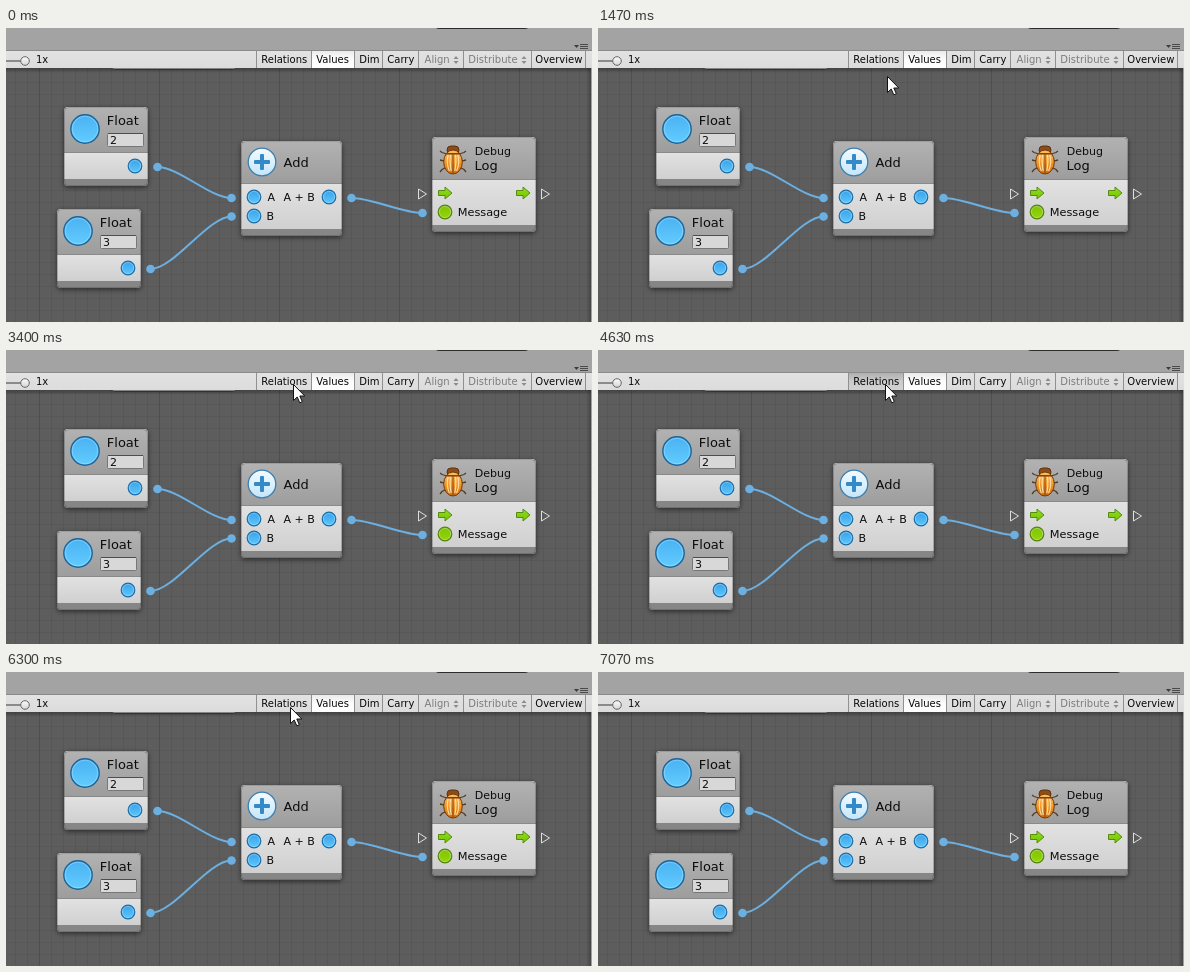
Write an HTML page with a canvas that moves like this. It is 586 by 294 pixels and loops after 7610 ms.

```html
<!DOCTYPE html>
<html>
<head>
<meta charset="utf-8">
<style>
html, body { margin: 0; width: 100%; height: 100%; overflow: hidden; background: #5c5c5c; }
canvas { display: block; width: 586px; height: 294px; }
</style>
</head>
<body>
<canvas id="stage" width="586" height="294"></canvas>
<script>
const W = 586, H = 294, LOOP = 7610;
const ctx = document.getElementById('stage').getContext('2d');
const FONT = 'px "DejaVu Sans", Verdana, sans-serif';
const BLUE = '#6cb0e2', PALE = '#dedede';

function text(str, x, y, size, color = '#0c0c0c') {
  ctx.font = size + FONT;
  ctx.fillStyle = color;
  ctx.fillText(str, x, y);
}

function rect(x, y, w, h, fill) {
  ctx.fillStyle = fill;
  ctx.fillRect(x, y, w, h);
}

function gradient(x0, y0, x1, y1, colors) {
  const g = ctx.createLinearGradient(x0, y0, x1, y1);
  colors.forEach((c, i) => g.addColorStop(i / (colors.length - 1), c));
  return g;
}

function vertical(y0, y1, ...colors) {
  return gradient(0, y0, 0, y1, colors);
}

function paint(fill, stroke, width = 1) {
  if (fill) { ctx.fillStyle = fill; ctx.fill(); }
  if (stroke) { ctx.strokeStyle = stroke; ctx.lineWidth = width; ctx.stroke(); }
}

function shape(points, fill, stroke, width) {
  ctx.beginPath();
  points.forEach(([x, y]) => ctx.lineTo(x, y));
  ctx.closePath();
  paint(fill, stroke, width);
}

function disc(x, y, r, fill, stroke, width) {
  ctx.beginPath();
  ctx.arc(x, y, r, 0, Math.PI * 2);
  paint(fill, stroke, width);
}

function box(x, y, w, h, r, fill, stroke) {
  ctx.beginPath();
  ctx.roundRect(x, y, w, h, r);
  paint(fill, stroke);
}

function curve(x0, y0, x1, y1, x2, y2, x3, y3, color) {
  ctx.beginPath();
  ctx.moveTo(x0, y0);
  ctx.bezierCurveTo(x1, y1, x2, y2, x3, y3);
  paint(null, color, 2);
}

function link(x0, y0, x1, y1, color = BLUE) {
  const pull = (x1 - x0) * .29;
  curve(x0, y0, x0 + pull, y0, x1 - pull, y1, x1, y1, color);
}

// Backdrop and toolbar

function backdrop() {
  rect(0, 40, W, H - 40, '#5d5d5d');
  for (let x = 9; x < W; x += 12) rect(x, 40, 1, H, `rgba(0,0,0,${x % 120 === 33 ? .14 : .06})`);
  for (let y = 42; y < H; y += 12) rect(0, y, W, 1, 'rgba(0,0,0,.05)');
  rect(0, 40, W, 5, vertical(40, 45, 'rgba(0,0,0,.3)', 'rgba(0,0,0,0)'));
  rect(W - 6, 40, 6, H, gradient(W - 6, 0, W, 0, ['rgba(0,0,0,0)', 'rgba(0,0,0,.3)']));
  rect(W - 1, 40, 1, H, '#a0a0a0');
  box(104.5, 30.5, 127, 11, 4, '#858585', '#333');
}

function sorter(x) {
  shape([[x - 2.5, 31], [x, 28], [x + 2.5, 31]], '#8c8c8c');
  shape([[x - 2.5, 33], [x, 36], [x + 2.5, 33]], '#8c8c8c');
}

const BUTTONS = [
  ['Relations', 250, 305, 255], ['Values', 305, 348, 310], ['Dim', 348, 376, 353],
  ['Carry', 376, 412, 381], ['Align', 412, 457, 418.3], ['Distribute', 457, 525, 462],
  ['Overview', 525, 579, 529]
];
const FACES = {
  off: ['#e2e2e2', '#dcdcdc'],
  on: ['#ebebeb', '#fcfcfc', '#fff'],
  press: ['#b0b0b0', '#cbcbcb', '#d2d2d2'],
  onPress: ['#dedede', '#f2f2f2', '#f6f6f6']
};

function toolbar(face) {
  rect(0, 0, W, 23, '#a3a3a3');
  box(429.5, -8, 93, 8.5, 3, '#555', '#2c2c2c');
  shape([[568, 17], [573, 17], [570.5, 20]], '#3c3c3c');
  for (let y = 16; y < 22; y += 2) rect(574, y, 8, 1, '#4a4a4a');
  rect(0, 22, W, 1, '#8a8a8a');
  rect(0, 23, W, 17, vertical(23, 40, ...FACES.off));

  rect(0, 32, 16, 2, '#8b8b8b');
  disc(19, 33, 4.3, vertical(28, 38, '#fff', '#d2d2d2'), '#666');
  text('1x', 30, 35, 10);

  rect(250, 23, 1, 17, '#909090');
  for (const [label, x0, x1, tx] of BUTTONS) {
    const mode = label === 'Relations' ? face : label === 'Values' ? 'on' : 'off';
    rect(x0 + 1, 23, x1 - x0 - 1, 17, vertical(23, 40, ...FACES[mode]));
    rect(x1, 23, 1, 17, '#909090');
    const dim = label === 'Align' || label === 'Distribute';
    text(label, tx + .3, 35, 10, dim ? '#7c7c7c' : '#080808');
  }
  sorter(450);
  sorter(518);
}

// Nodes

function panel(x, y, w, h, head, flat) {
  const foot = 7;
  ctx.save();
  ctx.shadowColor = 'rgba(0,0,0,.55)';
  ctx.shadowBlur = 5;
  ctx.shadowOffsetY = 1.5;
  box(x, y, w, h, 4, '#8c8c8c');
  ctx.restore();
  ctx.save();
  box(x, y, w, h, 4);
  ctx.clip();
  if (flat) {
    rect(x, y, w, h, vertical(y, y + h, '#b2b2b2', '#959595'));
  } else {
    rect(x, y, w, head, vertical(y, y + head, '#b2b2b2', '#9d9d9d'));
    rect(x, y + head, w, h - head - foot, vertical(y + head, y + h - foot, '#e2e2e2', '#d0d0d0'));
    rect(x, y + head, w, 1, '#8a8a8a');
    rect(x, y + h - foot, w, foot, '#868686');
  }
  rect(x, y, w, 1, 'rgba(255,255,255,.25)');
  ctx.restore();
  box(x + .5, y + .5, w - 1, h - 1, 4, null, 'rgba(60,60,60,.3)');
}

function port(x, y, top = '#3ba4ea', bottom = '#5cc4fb', rim = '#1a6ca8') {
  disc(x, y, 6.8, vertical(y - 6, y + 6, top, bottom), rim, 1.2);
  disc(x, y, 5.6, null, 'rgba(200,240,255,.35)');
}

function greenArrow(x, y) {
  shape([[x - 6.5, y - 2.5], [x, y - 2.5], [x, y - 6], [x + 7, y], [x, y + 6], [x, y + 2.5], [x - 6.5, y + 2.5]],
    vertical(y - 6, y + 6, '#93dd20', '#74c400'), '#558c10');
}

function floatNode(x, y, value, flat) {
  panel(x, y, 84, 79, 45, flat);
  disc(x + 21, y + 22, 14.2, vertical(y + 8, y + 36, '#4ab2f2', '#62ccff'), '#1c6599', 1.4);
  disc(x + 21, y + 22, 12.8, null, 'rgba(190,235,255,.4)');
  text('Float', x + 42.8, y + 18, 13);
  box(x + 43.5, y + 26.5, 36, 13, 1, '#d8d8d8', '#777');
  rect(x + 44, y + 26, 35, 1, '#4e4e4e');
  text(value, x + 46, y + 37, 11);
  port(x + 71, y + 59);
}

function addNode(flat) {
  panel(235, 113, 101, 95, 42, flat);
  disc(256, 134, 13.8, vertical(120, 148, '#f4fbff', '#c4e5fa'), '#3d7fae', 1.3);
  ctx.beginPath();
  ctx.roundRect(248, 132, 16, 4, 1);
  ctx.roundRect(254, 126, 4, 16, 1);
  paint('#3489c9');
  text('Add', 277.5, 139, 13);
  if (flat) {
    link(226, 170, 346, 170, PALE);
    link(226, 189, 346, 170, PALE);
  }
  port(248, 169);
  port(248, 188);
  port(323, 169);
  text('A', 261.5, 173, 11);
  text('B', 260.5, 192, 11);
  text('A + B', 277.5, 173, 11);
}

function beetle(x, y) {
  for (const s of [-1, 1]) {
    for (const [dy, tip] of [[-5, -8], [2, 1], [8, 13]]) {
      ctx.beginPath();
      ctx.moveTo(x + s * 6, y + dy);
      ctx.lineTo(x + s * 11, y + (dy + tip) / 2);
      ctx.lineTo(x + s * 13, y + tip);
      paint(null, '#5b3a1c', 1.3);
    }
  }
  box(x - 6, y - 13, 12, 8, 4, '#8f4c14', '#5b3210');
  ctx.beginPath();
  ctx.ellipse(x, y + 3, 9.3, 12, 0, 0, Math.PI * 2);
  paint(vertical(y - 9, y + 15, '#ffc163', '#f39a2c', '#cf6d10'), '#6e390c');
  for (const k of [-6, -3, 3, 6]) {
    ctx.beginPath();
    ctx.moveTo(x + k * .8, y - 4);
    ctx.quadraticCurveTo(x + k * 1.2, y + 3, x + k * .6, y + 12);
    paint(null, '#ffe0a6', 1.1);
  }
  rect(x - .5, y - 6, 1, 20, '#80430f');
  rect(x - 7, y - 6, 14, 1.5, '#80430f');
}

function logNode(flat) {
  panel(426, 109, 104, 95, 42, flat);
  beetle(447, 131);
  text('Debug', 468.8, 126.5, 11);
  text('Log', 468.5, 142, 13);
  if (flat) {
    rect(413, 164.5, 131, 2, PALE);
    curve(417, 165, 397, 166, 397, 177, 417, 185, PALE);
  }
  greenArrow(439, 165);
  greenArrow(517, 165);
  port(439, 184, '#82c400', '#93d40a', '#568208');
  text('Message', 451.7, 188, 11.3);
  for (const x of [412.5, 535.5])
    shape([[x, 161], [x + 8, 166], [x, 171]], null, PALE);
}

const LINKS = [[151.5, 139, 225.5, 170], [144.5, 241, 225.5, 188.5], [345.5, 170, 416.5, 185]];

function scene(flat, face) {
  backdrop();
  floatNode(58, 79, '2', flat);
  floatNode(51, 181, '3', flat);
  addNode(flat);
  logNode(flat);
  for (const [x0, y0, x1, y1] of LINKS) {
    link(x0, y0, x1, y1);
    disc(x0, y0, 4.3, BLUE);
    disc(x1, y1, 4.3, BLUE);
  }
  toolbar(face);
}

// Pointer

function pointerAt(t) {
  const part = (a, b) => Math.min(1, Math.max(0, (t - a) / (b - a)));
  if (t < 770 || t >= 7070) return null;
  if (t < 1565) {
    const u = 1 - part(745, 1530);
    return [288 + 122 * u ** 1.77, 40 + 252 * u ** 1.32];
  }
  if (t < 6270) {
    const u = part(1565, 1730);
    return [288 - u, 40 - 6 * u];
  }
  const u = part(6270, 7030);
  return [287 - 259 * u ** 1.38, 34 + 258 * u ** 1.73];
}

function pointer(x, y) {
  ctx.save();
  ctx.translate(Math.round(x) + .5, Math.round(y) + .5);
  shape([[0, 0], [0, 16], [3.7, 12.5], [6.3, 18.3], [8.8, 17.2], [6.3, 11.5], [11.3, 11.5]],
    '#fff', '#111');
  ctx.restore();
}

// Each entry: start time, relations shown, button face
const STATES = [
  [0, false, 'off'], [2000, false, 'press'], [2130, true, 'on'], [3270, true, 'onPress'],
  [3400, false, 'off'], [4630, false, 'press'], [4800, true, 'on'], [5930, true, 'onPress'],
  [6070, false, 'off']
];

function draw(now) {
  const t = now % LOOP;
  const [, flat, face] = STATES.filter(s => s[0] <= t).pop();
  ctx.clearRect(0, 0, W, H);
  scene(flat, face);
  const tip = pointerAt(t);
  if (tip) pointer(...tip);
}

const start = performance.now();
function tick() {
  draw(performance.now() - start);
  requestAnimationFrame(tick);
}
tick();
</script>
</body>
</html>
```
